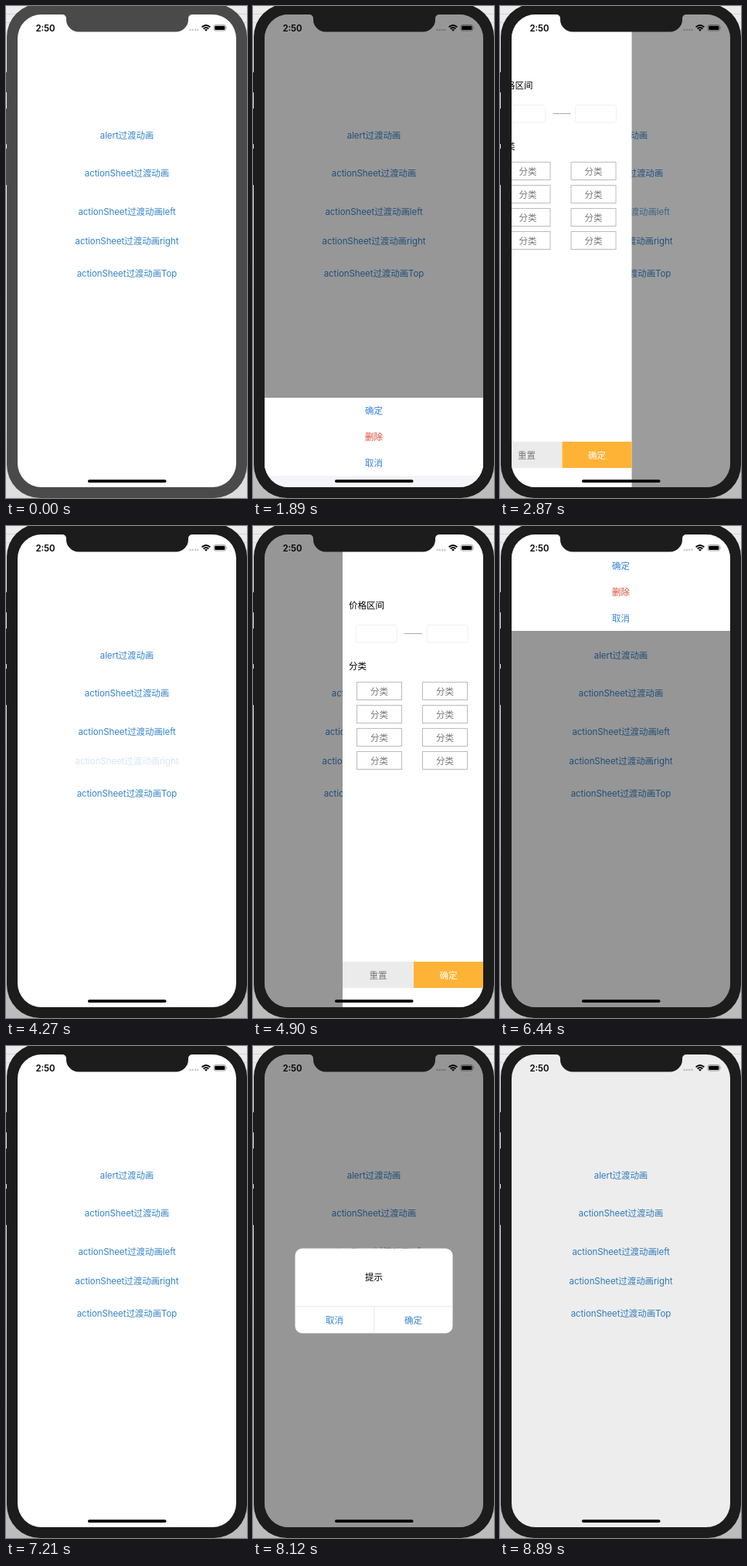
These frames come from a looping animation (312x638 px, 8.96 s). An HTML page:

```html
<!DOCTYPE html>
<html lang="zh">
<head>
<meta charset="utf-8">
<title>Transitions</title>
<style>
html, body { margin: 0; width: 100%; height: 100%; overflow: hidden; background: #e6e6e6; }
svg { display: block; width: 100vw; height: 100vh; }
text { font: 11.5px Inter, "Noto Sans CJK SC", "Noto Sans CJK", sans-serif; text-anchor: middle; }
.label { fill: #3584c9; letter-spacing: -.08px; }
.blue { fill: #3584d6; }
.red { fill: #d8482f; }
.grey { fill: #777; }
.white { fill: #fff; }
.start { text-anchor: start; }
.clock { font-weight: 600; font-size: 11.4px; }
</style>
</head>
<body>
<svg viewBox="0 0 312 638">
  <defs>
    <clipPath id="screen"><rect x="15" y="11" width="283" height="613" rx="31"/></clipPath>
    <linearGradient id="desk" x2="0" y2="1">
      <stop offset=".02" stop-color="#ececec"/>
      <stop id="shade" offset="1"/>
    </linearGradient>
  </defs>
  <rect width="312" height="638" fill="url(#desk)"/>
  <path d="M0 10.5H312M0 21.5H312" stroke="#d4d4d4"/>
  <g id="body">
    <path d="M0 86h3v26h-3zM0 133h3v46h-3zM0 185h3v47h-3z"/>
    <rect x="1" y="-3" width="311" height="641" rx="43"/>
  </g>
  <g clip-path="url(#screen)">
    <rect x="15" y="11" width="283" height="613" fill="#fff"/>
    <g id="labels"></g>
    <rect id="dim" x="15" y="11" width="283" height="613"/>
    <g id="sheet"></g>
    <g id="left"></g>
    <g id="right"></g>
    <g id="top"></g>
    <g id="alert"></g>
  </g>
  <path id="notch" d="M73 10V11A5 5 0 0 1 78 16V17.5A16 16 0 0 0 94 33.5H220A16 16 0 0 0 236 17.5V16A5 5 0 0 1 241 11V10z"/>
  <text class="clock" x="51" y="32.6">2:50</text>
  <g opacity=".22">
    <circle cx="238.5" cy="31" r="1.2"/><circle cx="241.8" cy="31" r="1.2"/>
    <circle cx="245.1" cy="31" r="1.2"/><circle cx="248.4" cy="31" r="1.2"/>
  </g>
  <path d="M253.6 27.4Q259 22.6 264.4 27.4M255.6 29.5Q259 26.6 262.4 29.5" fill="none" stroke="#000" stroke-width="1.8"/>
  <path d="M257 30.8Q259 29.4 261 30.8L259 32.8z"/>
  <rect x="269" y="24.5" width="15.6" height="7.6" rx="2.2" fill="none" stroke="#000" stroke-opacity=".45" stroke-width=".8"/>
  <rect x="270.2" y="25.7" width="13.2" height="5.2" rx="1.2"/>
  <path d="M285.6 27q1.6 1.3 0 2.6z" opacity=".45"/>
  <rect x="106" y="614.3" width="101.5" height="3.7" rx="1.8"/>
</svg>
<script>
const LOOP = 8960, SLIDE = 333, FADE = 292, DRAWER = 182;
const $ = id => document.getElementById(id);
const clamp = v => Math.min(1, Math.max(0, v));
const ease = v => (v = clamp(v)) * v * (3 - 2 * v);

const text = (s, x, cy, cls = '') => `<text class="${cls}" x="${x}" y="${cy + 4.5}">${s}</text>`;
const rect = (x, y, w, h, fill, extra = '') =>
  `<rect x="${x}" y="${y}" width="${w}" height="${h}" fill="${fill}" ${extra}/>`;
const rows = y => text('确定', 156.5, y, 'blue') + text('删除', 156.5, y + 34, 'red') + text('取消', 156.5, y + 68, 'blue');

function drawer() {
  const field = x => rect(x, 128.5, 53, 22.5, '#fff', 'rx="3" stroke="#f0f0f0"');
  let s = rect(0, 11, DRAWER, 613, '#fff') + text('价格区间', 8, 102, 'start') +
    field(17) + field(109) + rect(80, 139, 23, 1, '#aaa') + text('分类', 8, 181, 'start');
  for (let y = 214; y < 310; y += 30)
    for (const x of [18.5, 103.5])
      s += rect(x, y - 11.5, 58, 23, '#fff', 'stroke="#bbb"') + text('分类', x + 29, y, 'grey');
  return s + rect(0, 565, 92, 34, '#ebebeb') + rect(92, 565, 90, 34, '#ffb336') +
    text('重置', 46, 582, 'grey') + text('确定', 137, 582, 'white');
}

// label, centre y, press and release times
const labels = [
  ['alert过渡动画', 167, 7350, 7520],
  ['actionSheet过渡动画', 216.5, 770, 900],
  ['actionSheet过渡动画left', 266, 2520, 2660],
  ['actionSheet过渡动画right', 304, 4270, 4400],
  ['actionSheet过渡动画Top', 346, 5670, 5830]
];
$('labels').innerHTML = labels.map(l => text(l[0], 156.5, l[1], 'label')).join('');
$('sheet').innerHTML = rect(15, 508, 283, 116, '#f4f4fa') + rect(15, 508, 283, 101, '#fff') + rows(524.3);
$('left').innerHTML = $('right').innerHTML = drawer();
$('top').innerHTML = rect(15, 11, 283, 125, '#fff') + rows(51);
$('alert').innerHTML = rect(-102, -55, 204, 110, '#fff', 'rx="9"') + text('提示', 0, -18) +
  rect(-102, 20, 204, .7, '#ddd') + rect(0, 20, .7, 35, '#ddd') +
  text('取消', -51, 38, 'blue') + text('确定', 51, 38, 'blue');

const move = (el, x, y) => el.setAttribute('transform', `translate(${x} ${y})`);
// opening and closing times, and how each panel is placed at progress p
const panels = [
  ['sheet', 870, 1885, (el, p) => move(el, 0, 116 * (1 - p))],
  ['left', 2618, 3400, (el, p) => move(el, 15 - DRAWER * (1 - p), 0)],
  ['right', 4370, 5000, (el, p) => move(el, 298 - DRAWER * p, 0)],
  ['top', 5830, 6860, (el, p) => move(el, 0, -125 * (1 - p))],
  ['alert', 7520, 8675, (el, p) => {
    el.setAttribute('transform', `translate(156.5 317.5) scale(${.5 + p / 2})`);
    el.setAttribute('opacity', p);
  }, 180]
];

function draw(t) {
  const active = t >= 770, shell = active ? '#1c1c1c' : '#4a4a4a';
  $('body').setAttribute('fill', shell);
  $('notch').setAttribute('fill', shell);
  $('shade').setAttribute('stop-color', active ? '#bcbcbc' : '#dedede');

  labels.forEach(([, , down, up], i) => {
    const a = t < down ? 1 : .2 + .8 * clamp((t - up) / 300);
    $('labels').children[i].setAttribute('opacity', a);
  });

  let dim = 0;
  for (const [id, open, close, place, out = SLIDE] of panels) {
    const el = $(id);
    const p = ease((t - open) / SLIDE) - ease((t - close) / out);
    el.setAttribute('visibility', p > 0 ? 'visible' : 'hidden');
    place(el, p);
    dim += ease((t - open) / FADE) - ease((t - close) / FADE);
  }
  $('dim').setAttribute('opacity', .41 * dim);
}

const begin = performance.now();
function tick() {
  draw((performance.now() - begin) % LOOP);
  requestAnimationFrame(tick);
}
tick();
</script>
</body>
</html>
```
